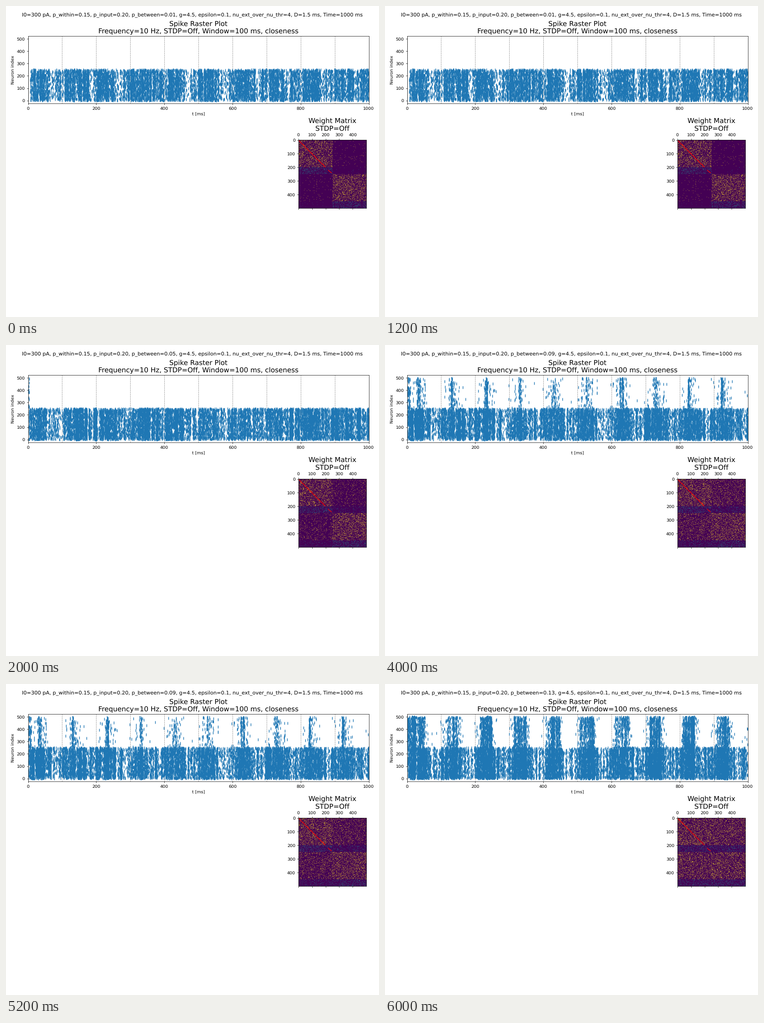
Write a matplotlib script that moves like this. It is 820x683 px and loops after 8000 ms.

```python
import matplotlib.pyplot as plt
import numpy as np
from matplotlib.animation import FuncAnimation

W, H = 820, 683
DPI = W / 12
N, HALF, N_EXC = 500, 250, 200
CELLS = 218  # resolution at which the weight matrix is sampled
P_WITHIN = 0.15
STEP = 0.5
T = np.arange(0, 1000, STEP)
PHASE = (T - 33) / 99.3 % 1
PHASE = np.minimum(PHASE, 1 - PHASE) * 99.3  # ms to the nearest input peak


def smooth_noise(rng, width):
    kernel = np.exp(-0.5 * (np.arange(-20, 21) * STEP / width) ** 2)
    noise = np.convolve(rng.normal(size=T.size + 40), kernel, "valid")
    return noise / noise.std()


def streaks(rng, strength):
    return np.exp(strength * smooth_noise(rng, 1.4))


def driven_rate(coupling, rng):
    """Spikes per ms of neurons 0-249, following the 10 Hz input."""
    drive = 1 / (1 + np.exp((PHASE - 25) / 4))
    rate = (7.5 + 11 * drive) * streaks(rng, 0.8 - 0.4 * drive)
    return rate * (T > 6 * (1 - 2 * coupling)), drive


def coupled_rate(coupling, rng):
    """Spikes per ms of neurons 250-499, woken by strong coupling."""
    start = coupling * 12 * (T < 2 + 16 * coupling ** 2)
    if coupling < 0.5:
        return start
    width = 18 * coupling ** 3
    burst = np.exp(-(PHASE / width) ** 4) * (3 + 9 * coupling ** 2)
    fringe = coupling * np.exp(-(PHASE / 26) ** 4)
    return start + (burst + fringe) * streaks(rng, 0.7) + 0.04 * coupling


def spikes(rate, first, rng):
    times = np.repeat(T, rng.poisson(rate * STEP))
    times = times + rng.uniform(0, STEP, times.size)
    return np.column_stack([times, rng.integers(first, first + HALF, times.size)])


def raster(k):
    rng = np.random.default_rng(20 + k)
    coupling = k / 3
    lower, drive = driven_rate(coupling, rng)
    upper = coupled_rate(coupling, rng)
    lower = lower + 0.8 * upper * drive
    return np.vstack([spikes(lower, 0, rng), spikes(upper, HALF, rng)])


def p_between(k):
    return 0.01 + 0.04 * k


def weights(k):
    rng = np.random.default_rng(70 + k)
    idx = (np.arange(CELLS) + 0.5) * N / CELLS
    same = (idx[:, None] < HALF) == (idx[None, :] < HALF)
    linked = rng.random((CELLS, CELLS)) < np.where(same, P_WITHIN, p_between(k))
    strength = np.where(idx % HALF < N_EXC, 1.0, 0.45)[:, None]
    return linked * strength


def heading(k):
    return (f"I0=300 pA, p_within={P_WITHIN:.2f}, p_input=0.20, "
            f"p_between={p_between(k):.2f}, g=4.5, epsilon=0.1, "
            "nu_ext_over_nu_thr=4, D=1.5 ms, Time=1000 ms")


def add_axes(left, top, width, height):
    return fig.add_axes([left / W, 1 - (top + height) / H, width / W, height / H])


plt.rcParams.update({"font.family": "DejaVu Sans", "text.hinting": "no_hinting"})
fig = plt.figure(figsize=(W / DPI + 1e-6, H / DPI + 1e-6), dpi=DPI, facecolor="white")
title = fig.suptitle(heading(0), fontsize=12)

ax = add_axes(48.5, 66, 749, 148.5)
ax.set(xlim=(0, 1000), ylim=(-25.5, 523), xlabel="t [ms]", ylabel="Neuron index")
ax.set_title("Spike Raster Plot\nFrequency=10 Hz, STDP=Off, Window=100 ms, closeness",
             fontsize=16)
for x in range(0, 1000, 100):
    ax.axvline(x, color="gray", ls="--", lw=0.8, zorder=0.5)
dots = ax.scatter([], [], s=30, marker="|", color="C0", linewidths=1.5)

mat = add_axes(642.7, 294.5, 149.4, 149.2)
image = mat.matshow(np.zeros((CELLS, CELLS)), vmin=0, vmax=1, aspect="auto",
                    extent=(-0.5, N - 0.5, N - 0.5, -0.5),
                    interpolation="hanning", interpolation_stage="rgba")
mat.set_xticks(range(0, N, 100))
mat.set_yticks(range(0, N, 100))
mat.set_title("Weight Matrix\nSTDP=Off", fontsize=16)
inputs = np.r_[0:N_EXC - 4:3, 219:243:3]
mat.plot(inputs, inputs, "s", color="red", ms=1.5, mew=0)

scenes = [(raster(k), weights(k)) for k in range(4)]


def update(k):
    points, matrix = scenes[k]
    dots.set_offsets(points)
    image.set_data(matrix)
    title.set_text(heading(k))
    return dots, image, title


anim = FuncAnimation(fig, update, frames=4, interval=2000, repeat=True, blit=False)
plt.show()
```
